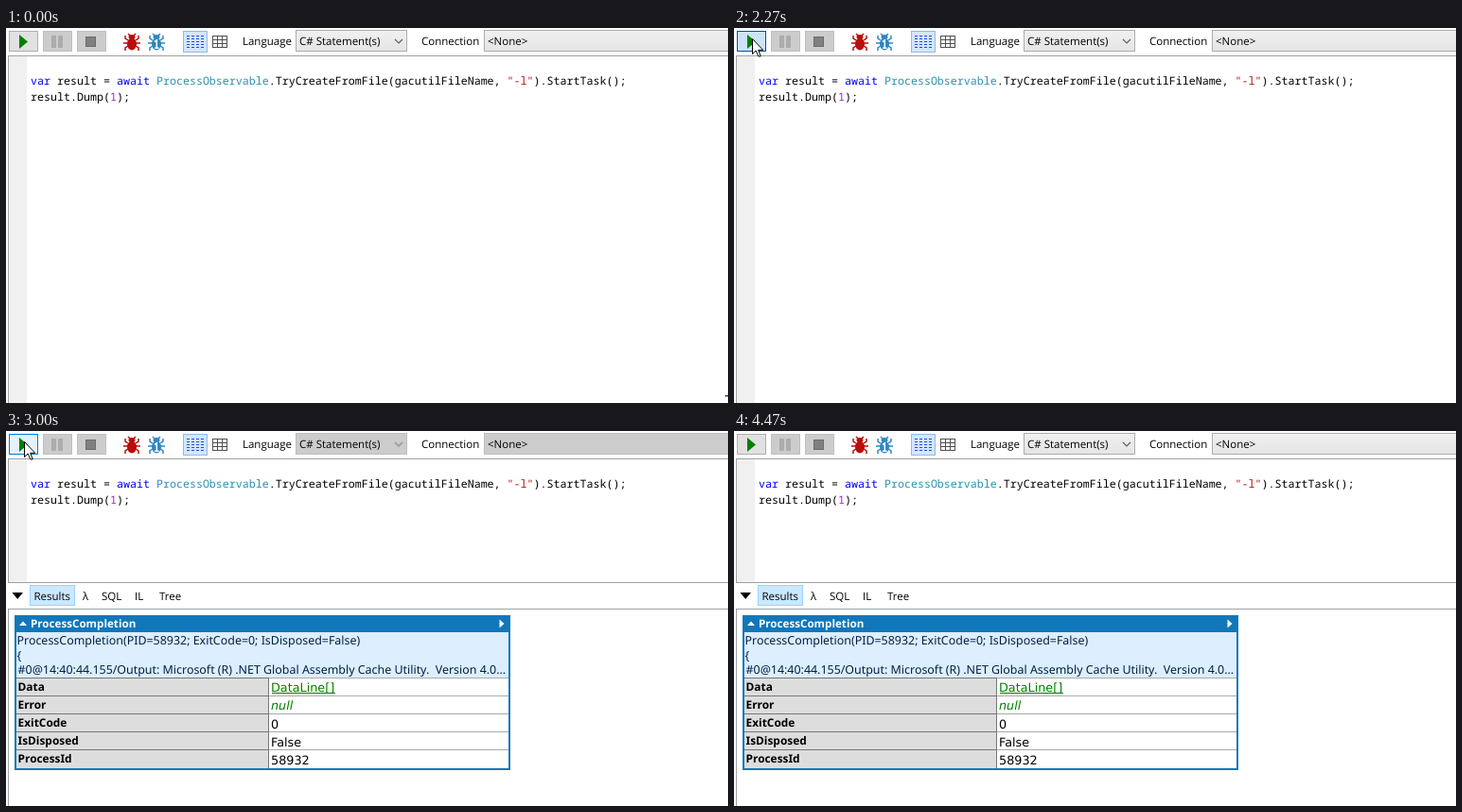
Write an HTML page that moves like this. It is 763 px wide and 397 px high and loops after 5190 ms.

```html
<!DOCTYPE html>
<html lang="en">
<head>
<meta charset="utf-8">
<title>Query run</title>
<style>
html, body { margin: 0; width: 100%; height: 100%; overflow: hidden; background: #fff; }
svg { display: block; width: 763px; height: 397px; }
text { white-space: pre; text-rendering: geometricPrecision; }
rect, .crisp { shape-rendering: crispEdges; }

.ui { font: 11.5px "Open Sans", "Noto Sans", sans-serif; }
.code { font: 11.667px "Noto Sans Mono", "DejaVu Sans Mono", monospace; }
.summary { font: 12.43px "Noto Sans", sans-serif; fill: #024; }
.label { font: bold 11.9px "Noto Sans", sans-serif; }
.value { font: 12.8px "DejaVu Sans", sans-serif; }
.kw { fill: #00f; }
.type { fill: #2b91af; }
.str { fill: #b41414; }
.num { fill: #a020d0; }

.btn { fill: #e1e1e1; stroke: #adadad; }
.off { fill: #ccc; stroke: #bfbfbf; }
.combo { fill: url(#face); stroke: #acacac; }
.frame { fill: none; stroke: #a0a0a0; }

/* one loop = 5190 ms */
.step, .fade { animation: 5190ms infinite; }
.step { animation-timing-function: step-end; }
.fade { animation-timing-function: linear; }
.speck { animation-name: speck; }
.cursor { animation-name: cursor; }
.hover { animation-name: hover; }
.press { animation-name: press; }
.lock { animation-name: lock; }
.dim { animation-name: dim; }
.ink { animation-name: ink; }
.busy { animation-name: busy; }
.panel { animation-name: panel; }
.result { animation-name: result; }

@keyframes speck {
  0% { transform: none; opacity: 1; }
  2.5% { transform: translateX(1px); opacity: 1; }
  3.84%, 100% { transform: translateX(3px); opacity: 0; }
}
@keyframes cursor {
  0% { transform: translate(12px, 15px); opacity: 0; }
  33.32% { transform: translate(12px, 15px); opacity: 1; }
  34.67% { transform: translate(14px, 14px); }
  36.02% { transform: translate(16px, 13px); }
  37.18% { transform: translate(17px, 12px); }
  39.87% { transform: translate(18px, 11px); }
  41.03% { transform: translate(19px, 11px); }
  77.06% { transform: translate(23px, 8px); }
  78.41% { transform: translate(27px, 17px); }
  79.57% { transform: translate(31px, 33px); opacity: 1; }
  80.91%, 100% { transform: translate(31px, 33px); opacity: 0; }
}
@keyframes hover {
  0%, 33.31% { opacity: 0; }
  33.32% { opacity: .8; }
  41.03%, 79.57% { opacity: 1; }
  86.12%, 100% { opacity: 0; }
}
@keyframes press {
  0% { opacity: 0; }
  43.73% { opacity: 1; }
  46.23%, 100% { opacity: 0; }
}
@keyframes lock {
  0%, 46.22% { opacity: 0; }
  46.23% { opacity: .4; }
  51.43%, 57.78% { opacity: 1; }
  57.79%, 100% { opacity: 0; }
}
@keyframes dim {
  0%, 46.23% { opacity: 0; }
  51.43%, 57.79% { opacity: 1; }
  65.5%, 100% { opacity: 0; }
}
@keyframes ink {
  0% { fill: #000; }
  46.23% { fill: #838383; }
  57.79%, 100% { fill: #000; }
}
@keyframes busy {
  0% { opacity: 0; }
  46.23% { opacity: 1; }
  57.79%, 100% { opacity: 0; }
}
@keyframes panel {
  0% { opacity: 0; }
  46.23%, 100% { opacity: 1; }
}
@keyframes result {
  0% { opacity: 0; }
  57.79%, 100% { opacity: 1; }
}
</style>
</head>
<body>
<svg viewBox="0 0 763 397">
  <defs>
    <linearGradient id="face" x2="0" y2="1">
      <stop stop-color="#f0f0f0"/><stop offset="1" stop-color="#e5e5e5"/>
    </linearGradient>
    <g id="bug">
      <path d="M-4 -2L-7 -4V-7M4 -2L7 -4V-7M-4 1H-9M4 1H9M-4 4L-7 6V9M4 4L7 6V9M-2 -7L-4 -9M2 -7L4 -9" fill="none" stroke="currentColor" stroke-width="1.5"/>
      <ellipse cy="-5.5" rx="3.5" ry="2.5" fill="currentColor"/>
      <ellipse cy="2" rx="5" ry="6.5" fill="currentColor"/>
    </g>
    <path id="play" d="M14 7L23 14.5L14 22Z"/>
    <path id="chevron" d="M411 12L415 16L419 12" fill="none" stroke-width="1.2"/>
  </defs>

  <!-- editor -->
  <rect x="3" y="30" width="19" height="367" fill="#f0f0f0"/>
  <path class="frame crisp" d="M763 29.5H2.5V397"/>
  <g class="code">
    <text x="26" y="60"><tspan class="kw">var</tspan> result = <tspan class="kw">await</tspan> <tspan class="type">ProcessObservable</tspan>.TryCreateFromFile(gacutilFileName, <tspan class="str">"-l"</tspan>).StartTask();</text>
    <text x="26" y="77">result.Dump(<tspan class="num">1</tspan>);</text>
  </g>

  <!-- run -->
  <rect class="btn" x="3.5" y="3.5" width="30" height="21"/>
  <rect class="fade hover" x="3.5" y="3.5" width="30" height="21" fill="#e5f1fb" stroke="#0078d7"/>
  <rect class="step press" x="3.5" y="3.5" width="30" height="21" fill="#cce4f7" stroke="#005499"/>
  <use href="#play" fill="#008000"/>
  <g class="fade lock">
    <rect class="off" x="3.5" y="3.5" width="30" height="21"/>
    <use href="#play" fill="#808080"/>
  </g>

  <!-- pause, stop -->
  <rect class="off" x="39.5" y="3.5" width="30" height="21"/>
  <path class="crisp" d="M48 8h5v13h-5zM55 8h5v13h-5z" fill="#acacac"/>
  <rect class="off" x="75.5" y="3.5" width="30" height="21"/>
  <rect x="84.5" y="9.5" width="10" height="10" fill="#808080" stroke="#6c6c6c"/>
  <g class="step busy">
    <rect class="btn" x="39.5" y="3.5" width="30" height="21"/>
    <path class="crisp" d="M48.5 8.5h4v12h-4zM55.5 8.5h4v12h-4z" fill="#ffa500" stroke="#e59400"/>
    <rect class="btn" x="75.5" y="3.5" width="30" height="21"/>
    <rect x="84.5" y="9.5" width="10" height="10" fill="#f00" stroke="#d00000"/>
  </g>

  <!-- bugs -->
  <use href="#bug" x="133" y="15" color="#b80f0a"/>
  <use href="#bug" x="159" y="15" color="#2f86c0"/>
  <path d="M157 14.5L159.3 13V21M157 21.3H161.6" fill="none" stroke="#fff" stroke-width="1.5"/>

  <!-- result formats -->
  <rect x="187.5" y="3.5" width="25" height="22" fill="#d2e6fc" stroke="#90b8ec"/>
  <path class="crisp" d="M191 8.5h18M191 11.5h18M191 14.5h18M191 17.5h18M191 20.5h18" stroke="#1b4fe0" stroke-dasharray="3 2"/>
  <path class="crisp" d="M218.5 8.5h15v12h-15zM218.5 12.5h15M218.5 16.5h15M223.5 8.5v12M228.5 8.5v12" fill="none" stroke="#505050"/>

  <!-- combos -->
  <g class="ui">
    <text x="250" y="18">Language</text>
    <rect class="combo" x="306.5" y="2.5" width="117" height="22"/>
    <rect class="off fade dim" x="306.5" y="2.5" width="117" height="22"/>
    <text class="step ink" x="310" y="18">C# Statement(s)</text>
    <use href="#chevron" stroke="#606060"/>
    <use class="fade dim" href="#chevron" stroke="#a8a8a8"/>
    <text x="439" y="18">Connection</text>
    <rect class="combo" x="505.5" y="2.5" width="270" height="22"/>
    <rect class="off fade dim" x="505.5" y="2.5" width="270" height="22"/>
    <text class="step ink" x="509" y="18">&lt;None&gt;</text>
  </g>

  <!-- results panel -->
  <g class="step panel">
    <rect y="160" width="763" height="237" fill="#fff"/>
    <path class="frame crisp" d="M2.5 155V160.5H763M763 188.5H2.5V397"/>
    <path d="M6.5 171H18L12.2 178Z"/>
    <rect x="25.5" y="163.5" width="47" height="21" fill="#cce8ff" stroke="#99d1ff"/>
    <g class="ui">
      <text x="29.5" y="179">Results</text>
      <text x="81" y="179">λ</text>
      <text x="101" y="179">SQL</text>
      <text x="136" y="179">IL</text>
      <text x="162" y="179">Tree</text>
    </g>
  </g>

  <g class="step result">
    <rect x="11" y="213" width="521" height="48" fill="#def"/>
    <rect x="11" y="261" width="266" height="96" fill="#ddd"/>
    <path class="crisp" d="M278 261.5H532M278 280.5H532M278 299.5H532M278 318.5H532M278 337.5H532" stroke="#aaa"/>
    <path class="crisp" d="M11 261.5H277.5V357M11 280.5H277M11 299.5H277M11 318.5H277M11 337.5H277" fill="none" stroke="#777"/>
    <rect x="10" y="196" width="522" height="162" fill="none" stroke="#17b" stroke-width="2"/>
    <rect x="9" y="195" width="524" height="18" fill="#17b"/>
    <path d="M14 206L18 201.5L22 206ZM521.5 199.5L526.5 204L521.5 208.5Z" fill="#fff"/>
    <text class="label" x="26" y="208" fill="#fff" style="font-size:11.65px">ProcessCompletion</text>
    <g class="summary">
      <text x="11.5" y="226">ProcessCompletion(PID=58932; ExitCode=0; IsDisposed=False)</text>
      <text x="11.5" y="242">{</text>
      <text x="12.5" y="257">#0@14:40:44.155/Output: Microsoft (R) .NET Global Assembly Cache Utility.&#160; Version 4.0...</text>
    </g>
    <g class="label">
      <text x="12.5" y="275">Data</text>
      <text x="12.5" y="294">Error</text>
      <text x="12.5" y="313">ExitCode</text>
      <text x="12.5" y="332">IsDisposed</text>
      <text x="12.5" y="351">ProcessId</text>
    </g>
    <g class="value">
      <text x="280" y="276" fill="#008000">DataLine[]</text>
      <path class="crisp" d="M281 277.5H348" stroke="#008000"/>
      <text x="280" y="295" fill="#008000" font-style="italic">null</text>
      <text x="280" y="315">0</text>
      <text x="280" y="334">False</text>
      <text x="280" y="353">58932</text>
    </g>
  </g>

  <rect class="step speck" x="760" y="389" width="3" height="1"/>
  <path class="step cursor" d="M.5 .5V16.5L4.2 13L6.8 19H9.2L6.7 12.3H11.7Z" fill="#fff" stroke="#000"/>
</svg>
</body>
</html>
```
